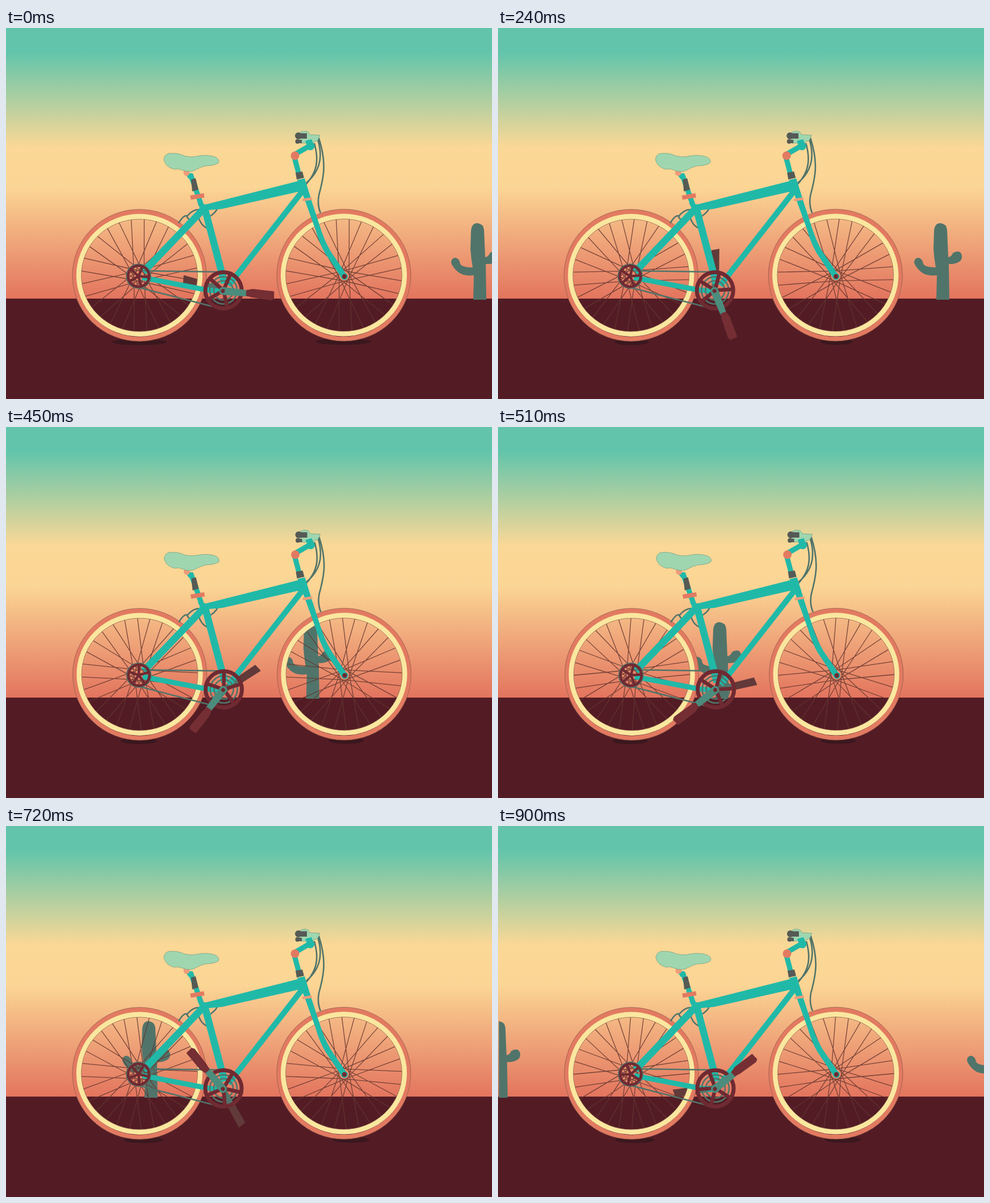
An HTML page for the animation above (0.93 s loop, 856 px wide and 654 px high).

```html
<!DOCTYPE html>
<html lang="en">
<head>
<meta charset="utf-8">
<title>Desert ride</title>
<style>
html, body { margin: 0; width: 100%; height: 100%; overflow: hidden; background: #531c25; }
svg { display: block; width: 856px; height: 654px; }
.teal { fill: #20b9a8; }
.tube { fill: none; stroke: #20b9a8; }
.dark { fill: #555a55; }
.mint { fill: #9fd6b0; stroke: #6f9a80; stroke-width: .7; }
.coral { fill: #e27a61; }
.cable { fill: none; stroke: #51746a; stroke-width: 2.6; }
.ring { fill: none; stroke: #6f2a32; }
.spoke { stroke: #63362f; stroke-width: 1.3; opacity: .85; }
</style>
</head>
<body>
<svg viewBox="0 0 856 654">
  <defs>
    <linearGradient id="sky" gradientUnits="userSpaceOnUse" x1="0" y1="0" x2="0" y2="477">
      <stop offset=".09" stop-color="#62c5ab"/>
      <stop offset=".44" stop-color="#fbd896"/>
      <stop offset=".59" stop-color="#fbd594"/>
      <stop offset="1" stop-color="#e3745e"/>
    </linearGradient>
    <clipPath id="view"><path d="M1.500 0H856V654H1.500z"/></clipPath>
    <path id="cactus" fill="#51746a" d="M819 358Q820 344 830 344Q841 345 842 356L844 404Q850 403 852 397Q858 392 865 395Q871 402 866 410Q858 417 845 416L846 479H823L824 436Q806 438 796 430Q787 422 784 414Q784 405 792 405Q799 407 800 416Q804 422 822 422Q819 405 818 390z"/>
    <g id="rim" fill="none">
      <ellipse rx="114.5" ry="112.3" stroke="#e27a61" stroke-width="7.8"/>
      <ellipse rx="106.7" ry="103.5" stroke="#fae79f" stroke-width="8.8"/>
      <g stroke="#8a5a48" stroke-width=".7">
        <ellipse rx="118" ry="116.3"/><ellipse rx="102.4" ry="99"/>
      </g>
    </g>
  </defs>

  <path fill="url(#sky)" d="M0 0H856V478H0z"/>
  <path fill="#531c25" d="M0 477H856V654H0z"/>
  <g clip-path="url(#view)">
    <g id="cacti"><use href="#cactus"/><use href="#cactus" x="871"/></g>
  </g>
  <g fill="#3b171e">
    <ellipse id="shadowRear" cy="553.5" ry="5.5"/>
    <ellipse id="shadowFront" cy="553" ry="5.5"/>
  </g>

  <g id="bike">
    <g id="farCrank">
      <path fill="#51746a" d="M0 -5H36V6H0z"/>
      <path fill="#623a3a" d="M30 -6L71 -8L74 6L32 7z"/>
    </g>
    <g id="spokesRear"></g>
    <g id="spokesFront"></g>
    <use href="#rim" x="235" y="436"/>
    <use href="#rim" x="595" y="435.7"/>

    <g class="cable">
      <path d="M551 194C565 238 560 262 551 295Q548 312 554 326M549 196C560 232 550 255 529 273M543 203C552 235 547 255 528 276"/>
      <path d="M304 344Q312 330 318 331Q322 341 330 338Q340 333 338 325M318 333Q328 319 342 320M338 330Q343 350 356 353M356 334Q368 327 372 319"/>
    </g>

    <path class="tube" stroke-width="9" d="M325 258L345 315"/>
    <path class="teal" d="M315 256H328L331 264L322 266z"/>
    <circle cx="318" cy="255" r="5.5" fill="#f09b79"/>
    <path class="dark" d="M326 267L334 265L339 285L328 288z"/>
    <path class="mint" d="M278 232Q279 222 288 221Q300 220 308 223Q322 230 342 225Q358 223 370 228Q377 233 374 238Q366 243 352 243Q343 245 336 249Q325 256 312 251Q304 247 296 249Q281 245 278 232z"/>

    <path class="tube" stroke-width="9" d="M240 440L352 461.500L384 465"/>
    <path class="tube" stroke-width="12.500" d="M348 319L242 430M350 318L385 450"/>
    <path class="tube" stroke-width="10" d="M521 289L392 454"/>
    <path class="teal" d="M337 309L352 311L514 270L522 266L528 290L513 289L380 319L346 322z"/>
    <path stroke="#e27a61" stroke-width="7.5" d="M325 299L349 295"/>
    <path class="teal" d="M513 268L526 265L539 307L551 344Q560 374 572 394L600 435L592 442L562 397Q552 380 545 355L524 297z"/>
    <path stroke="#f09b79" stroke-width="4.5" stroke-linecap="round" d="M524 303L537 301"/>
    <path class="tube" stroke-width="9" d="M508 228L517 262M510 222L536 207"/>
    <path class="dark" d="M510 255L522 253L525 264L512 267z"/>
    <circle class="teal" cx="536" cy="208" r="7.5"/>
    <circle class="coral" cx="509" cy="225" r="7.5"/>
    <path class="mint" d="M518 184Q524 180 532 183L535 188L553 189L549 198L538 203L518 203L517 196z"/>
    <path class="teal" d="M527 199L538 196L542 206L531 209z"/>
    <g class="dark">
      <circle cx="515" cy="190" r="6"/><path d="M515 185.500H530V195H515z"/>
      <circle cx="513.500" cy="200" r="4"/><path d="M514 197H521V203H514z"/>
    </g>

    <circle class="teal" cx="596" cy="438" r="6"/>
    <circle cx="596" cy="438" r="4.200" fill="#6f2a32"/>

    <path class="cable" d="M240 428L380 430M236 458L368 492"/>
    <g transform="translate(233.5 437.500)">
      <circle class="cable" r="21" stroke-width="2"/>
      <circle class="ring" r="18.500" stroke-width="4.500"/>
      <g id="cog" class="ring" stroke-width="4.500"></g>
    </g>
    <g transform="translate(383 462.500)">
      <circle class="cable" r="24" stroke-width="2"/>
      <circle class="cable" r="17"/>
      <circle class="ring" r="32" stroke-width="7"/>
      <g id="spider" class="ring" stroke-width="6.500"></g>
    </g>
    <g id="nearCrank">
      <path fill="#4b8c7d" d="M0 -7L44 -5V6L0 7A7 7 0 0 1 0 -7z"/>
      <path fill="#742e34" d="M41 -5L52 -8L90 -7L91 6L86 9L52 7L41 5z"/>
      <circle r="3.500" fill="#6f2a32"/>
    </g>
  </g>
</svg>
<script>
const LOOP = 930, STEP = 30, SPACING = 871;
const TIMES = [0, 120, 240, 360, 510, 600, 720, 900, 930];
const travel = [0, 10.5, 51, 147, 440, 850, 1450, 1700, 1742];
const near = [5, 21, 68, 107, 141, 179, 229, 321, 365];
const far = [197, 221, 272, 301, 349, 382, 423, 534, 557];
const sway = [0, 0, -.7, 0, .7, .5, 0, 0, 0];
const shadows = {
  shadowRear: [[186, 189, 205, 205, 201, 204, 207, 206, 186], [284, 279, 266, 271, 264, 270, 277, 276, 284]],
  shadowFront: [[545, 548, 568, 568, 568, 571, 575, 575, 545], [643, 633, 624, 629, 631, 635, 640, 640, 643]]
};
const $ = id => document.getElementById(id);
const move = (id, x, y, angle = 0) =>
  $(id).setAttribute('transform', `translate(${x} ${y}) rotate(${angle})`);

// Monotone cubic interpolation through the key poses
function at(values, t) {
  const secant = k => (values[k + 1] - values[k]) / (TIMES[k + 1] - TIMES[k]);
  const slope = k => {
    if (k === 0) return 0;
    if (k === TIMES.length - 1) return secant(k - 1);
    const a = secant(k - 1), b = secant(k);
    return a * b > 0 ? 2 * a * b / (a + b) : 0;
  };
  const i = TIMES.findIndex((_, k) => t < TIMES[k + 1]);
  const h = TIMES[i + 1] - TIMES[i], u = (t - TIMES[i]) / h, v = 1 - u;
  return v * v * ((1 + 2 * u) * values[i] + u * h * slope(i))
       + u * u * ((1 + 2 * v) * values[i + 1] - v * h * slope(i + 1));
}

// Crossed spokes leave the hub at an angle on alternating sides
function addSpokes(id, count = 28) {
  let d = '';
  for (let i = 0; i < count; i++) {
    const a = i * 2 * Math.PI / count, b = a + (i % 2 ? 1.25 : -1.25);
    d += `M${9 * Math.cos(b)} ${9 * Math.sin(b)}L${103 * Math.cos(a)} ${103 * Math.sin(a)}`;
  }
  $(id).innerHTML = `<path class="spoke" d="${d}"/>`;
}

function addArms(id, radius) {
  for (let i = 0; i < 5; i++)
    $(id).innerHTML += `<path d="M0 0H${radius}" transform="rotate(${i * 72})"/>`;
}

addSpokes('spokesRear');
addSpokes('spokesFront');
addArms('cog', 17);
addArms('spider', 30);

function draw() {
  const t = Math.floor(performance.now() % LOOP / STEP) * STEP;
  const turn = at(near, t);
  move('cacti', -(at(travel, t) % SPACING), 0);
  move('bike', at(sway, t), 0);
  move('nearCrank', 382, 463.5, turn);
  move('farCrank', 382, 463, at(far, t));
  move('spokesRear', 234.5, 437, turn);
  move('spokesFront', 595.5, 437, turn);
  move('cog', 0, 0, turn);
  move('spider', 0, 0, turn);
  for (const id in shadows) {
    const [left, right] = shadows[id].map(edge => at(edge, t));
    $(id).setAttribute('cx', (left + right) / 2);
    $(id).setAttribute('rx', (right - left) / 2);
  }
  requestAnimationFrame(draw);
}
draw();
</script>
</body>
</html>
```
